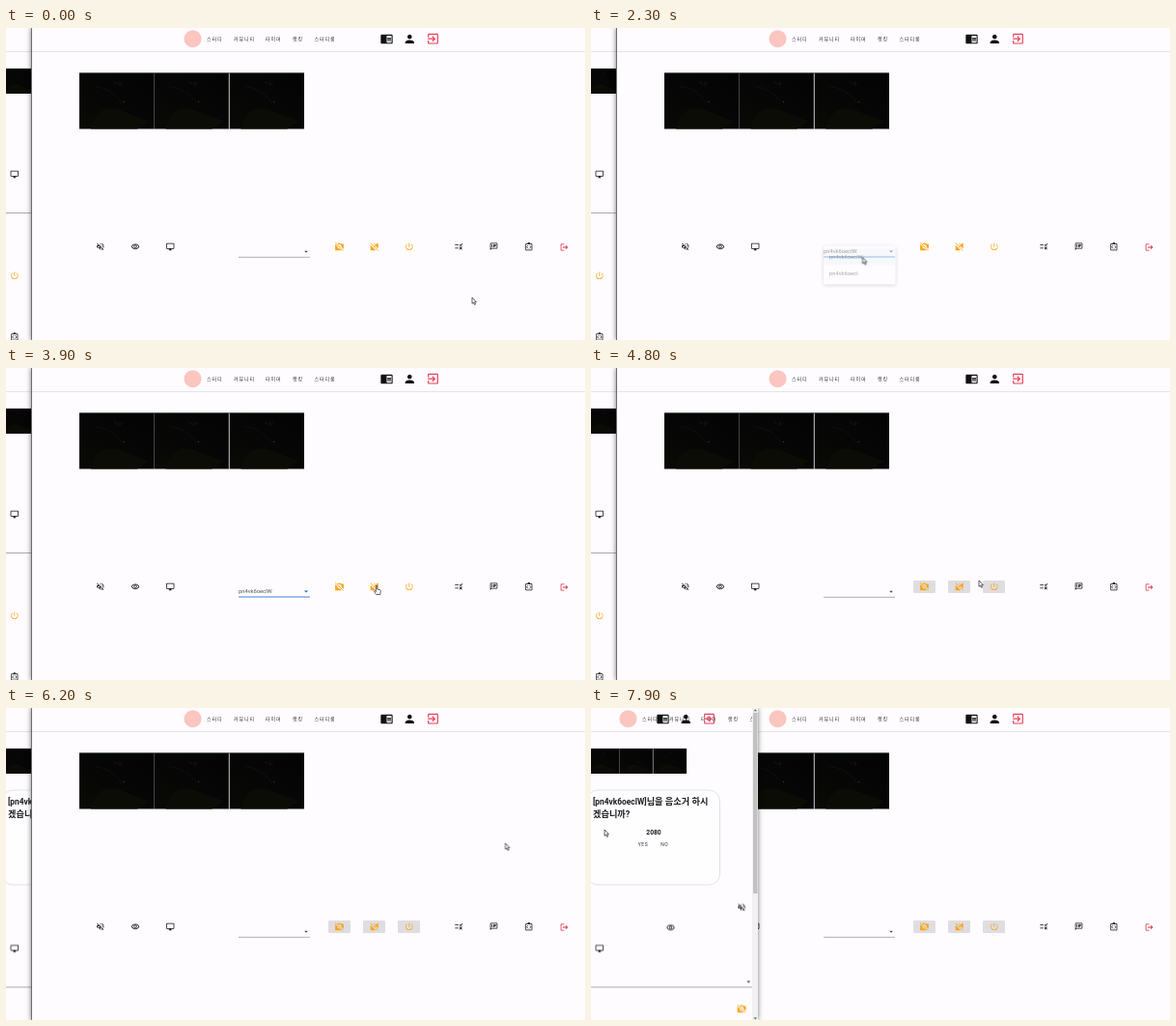
These frames come from a looping animation (600 by 323 pixels, 8000 ms). An HTML page:

```html
<!DOCTYPE html>
<html>
<head>
<meta charset="utf-8">
<title>Study room</title>
<style>
@property --ms { syntax: '<integer>'; inherits: true; initial-value: 4980; }
html, body { margin: 0; width: 100%; height: 100%; overflow: hidden; background: #fefcff; }
#stage { position: relative; width: 600px; height: 323px; overflow: hidden; }
svg { display: block; position: absolute; left: 0; top: 0; }
text { font-family: Roboto, "Noto Sans CJK KR", "Noto Sans CJK JP", sans-serif; }

.win { position: absolute; top: 0; height: 323px; background: #fefcff; box-shadow: 0 0 5px rgba(0, 0, 0, .55); }
.win svg { overflow: hidden; }
#side { left: -10px; width: 183px; border-right: 1px solid #8b8b8d; box-sizing: border-box; z-index: 1; animation: raise 8s step-end infinite; }
#side svg { left: 10px; }
#main { left: 26px; width: 584px; border-left: 1px solid #6d6d6f; box-sizing: border-box; z-index: 2; }
#pointer { z-index: 9; overflow: visible; }

.nav { font-size: 5px; letter-spacing: .9px; fill: #333; }
.opt { font-size: 5.8px; fill: #555; }
.red { fill: #e8405a; }
.amber { fill: #f9a61c; stroke: none; }
.title { font-weight: 700; font-size: 8.4px; fill: #1d1d1f; }
.ko { font-size: 9.2px; }
.btn { font-size: 5px; letter-spacing: .5px; fill: #333; }
#count { position: absolute; left: 55px; width: 40px; top: 125px; text-align: center;
  font: 700 6.7px/9px Roboto, sans-serif; color: #1d1d1f;
  counter-reset: ms var(--ms); animation: count 8s infinite; }
#count::after { content: counter(ms); }

#modal, #count { visibility: hidden; }
#modal { animation: late 8s step-end infinite; }
#count { animation: late 8s step-end infinite, count 8s linear infinite; }
#list { animation: push 8s step-end infinite; }
#off { animation: off 8s step-end infinite; }
#focus { animation: focus 8s step-end infinite; }
#idle { animation: idle 8s step-end infinite; }
#value { animation: value 8s step-end infinite; }
#menu { filter: drop-shadow(0 1.5px 2px rgba(0, 0, 0, .3)); animation: menu 8s linear infinite; }
#cursor { animation: move 8s linear infinite; }
#hand { animation: hand 8s step-end infinite; }
#arrow { animation: arrow 8s step-end infinite; }

@keyframes raise { 0% { z-index: 1 } 92.5%, 100% { z-index: 3 } }
@keyframes late { 0% { visibility: hidden } 62.5%, 100% { visibility: visible } }
@keyframes push { 0% { transform: none } 62.5%, 100% { transform: translateY(97.5px) } }
@keyframes off { 0% { opacity: 0 } 58.75%, 100% { opacity: 1 } }
@keyframes focus { 0% { opacity: 0 } 12.5% { opacity: 1 } 58.75%, 100% { opacity: 0 } }
@keyframes idle { 0% { opacity: 1 } 12.5% { opacity: 0 } 58.75%, 100% { opacity: 1 } }
@keyframes value { 0% { opacity: 0 } 27.5% { opacity: 1 } 58.75%, 100% { opacity: 0 } }
@keyframes menu {
  0%, 12.49% { opacity: 0 } 12.5% { opacity: .5 } 13.75% { opacity: .8 }
  15%, 27.5% { opacity: 1 } 28.75% { opacity: .5 } 30%, 100% { opacity: 0 }
}
@keyframes count {
  0% { --ms: 4980 }
  62.5% { --ms: 4980; animation-timing-function: steps(30) }
  100% { --ms: 1980 }
}
@keyframes hand {
  0% { opacity: 0 } 10% { opacity: 1 } 27.5% { opacity: 0 } 37.5% { opacity: 1 }
  42.5% { opacity: 0 } 43.75% { opacity: 1 } 47.5% { opacity: 0 } 48.75% { opacity: 1 } 58.75%, 100% { opacity: 0 }
}
@keyframes arrow {
  0% { opacity: 1 } 10% { opacity: 0 } 27.5% { opacity: 1 } 37.5% { opacity: 0 }
  42.5% { opacity: 1 } 43.75% { opacity: 0 } 47.5% { opacity: 1 } 48.75% { opacity: 0 } 58.75%, 100% { opacity: 1 }
}
@keyframes move {
  0% { transform: translate(483px, 279px) }
  1.25% { transform: translate(483px, 279px); animation-timing-function: steps(8) }
  11.25% { transform: translate(306px, 232px); animation-timing-function: steps(2) }
  13.75% { transform: translate(305.5px, 234px) }
  16.25% { transform: translate(305.5px, 234px); animation-timing-function: steps(7) }
  25% { transform: translate(281.5px, 237.5px) }
  31.25% { transform: translate(281.5px, 237.5px); animation-timing-function: steps(5) }
  37.5% { transform: translate(383px, 223.5px) }
  41.25% { transform: translate(383px, 223.5px); animation-timing-function: steps(3) }
  45% { transform: translate(418px, 224px) }
  46.25% { transform: translate(418px, 224px); animation-timing-function: steps(2) }
  48.75% { transform: translate(384px, 225px); animation-timing-function: steps(3) }
  52.5% { transform: translate(391px, 227px); animation-timing-function: steps(3) }
  56.25% { transform: translate(385px, 225px) }
  57.5% { transform: translate(385px, 225px); animation-timing-function: steps(2) }
  60% { transform: translate(402px, 220px) }
  70% { transform: translate(402px, 220px); animation-timing-function: steps(5) }
  76.25% { transform: translate(517.5px, 140px) }
  81.25% { transform: translate(517.5px, 140px); animation-timing-function: steps(7) }
  90%, 100% { transform: translate(14px, 126px) }
}
</style>
</head>
<body>
<div id="stage">

<svg width="0" height="0">
  <defs>
    <linearGradient id="dark" x1="0" y1="1" x2="1" y2="0">
      <stop offset="0" stop-color="#0a0a06"/><stop offset=".5" stop-color="#050605"/><stop offset="1" stop-color="#020302"/>
    </linearGradient>

    <!-- icons on a 24-unit grid, centred on 0,0 -->
    <g id="reader"><path transform="translate(-12 -12)" d="M13 12h7v1.5h-7zm0-2.5h7V11h-7zm0 5h7V16h-7zM21 4H3c-1.1 0-2 .9-2 2v13c0 1.1.9 2 2 2h18c1.1 0 2-.9 2-2V6c0-1.1-.9-2-2-2zm0 15h-9V6h9v13z"/></g>
    <g id="person"><path transform="translate(-12 -12)" d="M12 12c2.2 0 4-1.8 4-4s-1.8-4-4-4-4 1.8-4 4 1.8 4 4 4zm0 2c-2.7 0-8 1.3-8 4v2h16v-2c0-2.7-5.3-4-8-4z"/></g>
    <g id="exit"><path transform="translate(-12 -12)" d="M10.1 15.6L11.5 17l5-5-5-5-1.4 1.4 2.6 2.6H3v2h9.7zM19 3H5c-1.1 0-2 .9-2 2v4h2V5h14v14H5v-4H3v4c0 1.1.9 2 2 2h14c1.1 0 2-.9 2-2V5c0-1.1-.9-2-2-2z"/></g>
    <g id="mute"><path transform="translate(-12 -12)" d="M4.3 2.9L2.9 4.3l4.4 4.4L7 9H3v6h4l5 5v-6.6l4.2 4.2c-.7.5-1.4.9-2.2 1.1v2.1c1.3-.3 2.6-.9 3.6-1.8l2 2.1 1.5-1.4zM10 15.2L7.8 13H5v-2h2.8l.9-.9 1.3 1.3zM19 12c0 .8-.1 1.6-.4 2.3l1.5 1.6c.6-1.2.9-2.5.9-3.9 0-4.3-3-7.9-7-8.8v2.1c2.9.8 5 3.5 5 6.7zm-7-8l-1.9 1.9L12 7.8zm4.5 8c0-1.8-1-3.3-2.5-4v1.8l2.5 2.4z"/></g>
    <g id="eye"><path transform="translate(-12 -11.5)" d="M12 6c3.8 0 7.2 2.1 8.8 5.5-1.6 3.4-5 5.5-8.8 5.5s-7.2-2.1-8.8-5.5C4.800 8.100 8.200 6 12 6m0-2C7 4 2.700 7.100 1 11.500 2.700 15.900 7 19 12 19s9.300-3.100 11-7.500C21.300 7.100 17 4 12 4zm0 5a2.500 2.500 0 0 1 0 5 2.500 2.500 0 0 1 0-5m0-2a4.500 4.500 0 0 0 0 9 4.500 4.500 0 0 0 0-9z"/></g>
    <g id="screen"><path transform="translate(-12 -12)" d="M21 2H3c-1.100 0-2 .9-2 2v12c0 1.100.9 2 2 2h7v2H8v2h8v-2h-2v-2h7c1.100 0 2-.9 2-2V4c0-1.100-.9-2-2-2zm0 14H3V4h18z"/></g>
    <g id="cam">
      <path d="M-4-9h7l2 2h5a1 1 0 0 1 1 1V6L5 1A5 5 0 0 0-2-5L-6-8zM-11-6l6 5A5 5 0 0 0 1 5l5 5H-10a1 1 0 0 1-1-1z"/>
      <path d="M-11-10L10 10M-2-1L1 2" fill="none" stroke="#f9a61c" stroke-width="2"/>
    </g>
    <g id="chatoff">
      <path d="M-10 10V-4L4 10zM10-9V5L2-2zM-2-7H4L1-4z"/>
      <path d="M-10-9L10 10M9-9L-3 3" fill="none" stroke="#f9a61c" stroke-width="2.2"/>
    </g>
    <g id="power"><path transform="translate(-12 -12)" d="M13 3h-2v10h2zm4.800 2.200l-1.400 1.400A7 7 0 1 1 7.600 6.600L6.200 5.200a9 9 0 1 0 11.600 0z"/></g>
    <g id="rule"><path transform="translate(-12 -12)" d="M16.500 11L13 7.500l1.400-1.400 2.100 2.100 4.300-4.300 1.400 1.400zM11 7H2v2h9zm10 6.400L19.600 12 17 14.600 14.400 12 13 13.400l2.600 2.600-2.600 2.600 1.400 1.400 2.600-2.600 2.600 2.600 1.400-1.400-2.600-2.600zM11 15H2v2h9z"/></g>
    <g id="chat"><path transform="translate(-12 -12)" d="M20 2H4c-1.100 0-2 .9-2 2v18l4-4h14c1.100 0 2-.9 2-2V4c0-1.100-.9-2-2-2zm0 14H5.200L4 17.200V4h16zM6 12h2v2H6zm0-3h2v2H6zm0-3h2v2H6zm4 6h5v2h-5zm0-3h8v2h-8zm0-3h8v2h-8z"/></g>
    <g id="code">
      <path d="M-8-7H8V9H-8zM-2-3l-3.500 4L-2 5M2-3l3.500 4L2 5" fill="none" stroke="#222" stroke-width="2"/>
      <path d="M-3.500-7a3.500 3.500 0 0 1 7 0z"/>
    </g>
    <g id="leave"><path transform="translate(-12 -12)" d="M17 7l-1.400 1.400 2.600 2.600H8v2h10.200l-2.600 2.600L17 17l5-5zM4 5h8V3H4c-1.100 0-2 .9-2 2v14c0 1.100.9 2 2 2h8v-2H4z"/></g>

    <g id="tile">
      <rect width="77.500" height="58" fill="url(#dark)"/>
      <path d="M12 56C18 36 30 34 46 40L72 50 60 58H12z" fill="#0c0c07"/>
      <path d="M16 14Q34 16 44 31" fill="none" stroke="#10100a"/>
      <path d="M36 9l4 3M42 9v4M45 10l-2 2" fill="none" stroke="#262622" stroke-width=".6"/>
      <circle cx="46" cy="30" r=".8" fill="#38381a"/>
    </g>
    <g id="tiles">
      <use href="#tile"/><use href="#tile" x="77.500"/><use href="#tile" x="155.500"/>
      <path d="M155.200 0v58" stroke="#b9b9b5" stroke-width=".8"/>
      <path d="M0 .3h233" stroke="#1d2a22" stroke-width=".6"/>
    </g>

    <g id="nav">
      <circle cx="193.500" cy="11.200" r="9" fill="#fac6bf"/>
      <g class="nav">
        <text x="208" y="13.200">스터디</text><text x="236" y="13.200">커뮤니티</text>
        <text x="269" y="13.200">타이머</text><text x="297" y="13.200">랭킹</text>
        <text x="319.500" y="13.200">스터디룸</text>
      </g>
    </g>
    <g id="acts">
      <use href="#reader" transform="translate(394.500 11.300) scale(.56)"/>
      <use href="#person" transform="translate(418.300 11.300) scale(.58)"/>
      <use href="#exit" class="red" transform="translate(442.500 11.200) scale(.6)"/>
    </g>
  </defs>
</svg>

<div id="side" class="win">
  <svg width="173" height="323" viewBox="0 0 173 323" fill="#111">
    <path d="M0 24.500h168" stroke="#e6e4e8"/>
    <use href="#nav" x="-155"/>
    <use href="#acts" x="-320"/>
    <use href="#tiles" transform="translate(-5.300 42) scale(.448)"/>
    <g id="modal">
      <rect x="-4" y="85" width="137.500" height="98" rx="11" fill="#fefdff" stroke="#dcdadd" stroke-width=".8"/>
      <text class="title" x="2" y="100">[pn4vk6oeclW]<tspan class="ko">님을 음소거 하시</tspan></text>
      <text class="title ko" x="2" y="112.500">겠습니까?</text>
      <text class="btn" x="48.800" y="142.800">YES</text>
      <text class="btn" x="72.300" y="142.800">NO</text>
    </g>
    <g id="list">
      <use href="#mute" transform="translate(156 108.800) scale(.4)"/>
      <use href="#eye" transform="translate(82.500 129.700) scale(.38)"/>
      <use href="#screen" transform="translate(8.800 151.500) scale(.38)"/>
      <path d="M0 191.500h167" stroke="#a2a1a4" stroke-width=".9"/>
      <path d="M161.200 185h4l-2 2.200z" fill="#555"/>
      <g class="amber">
        <use href="#cam" transform="translate(156 213.800) scale(.4)"/>
        <use href="#chatoff" transform="translate(82.500 235) scale(.4)"/>
        <use href="#power" transform="translate(8.800 256.300) scale(.42)"/>
      </g>
      <use href="#rule" transform="translate(156 277) scale(.4)"/>
      <use href="#chat" transform="translate(82.500 298) scale(.38)"/>
      <use href="#code" transform="translate(8.800 319.500) scale(.4)"/>
    </g>
    <path d="M167 0h6v323h-6z" fill="#f1f1f1"/>
    <path d="M168 5h4.500v187H168z" fill="#c1c1c1"/>
    <path d="M168.500 3.200h3.500l-1.700-2zM168.500 320.500h3.500l-1.700 2z" fill="#666"/>
  </svg>
  <div id="count"></div>
</div>

<div id="main" class="win">
  <svg width="573" height="323" viewBox="27 0 573 323" fill="#111">
    <path d="M27 24.500h573" stroke="#e6e4e8"/>
    <use href="#nav"/>
    <use href="#acts"/>
    <use href="#tiles" transform="translate(76 46.500)"/>

    <use href="#mute" transform="translate(97.800 226.300) scale(.4)"/>
    <use href="#eye" transform="translate(134 226.300) scale(.38)"/>
    <use href="#screen" transform="translate(170.200 226.500) scale(.38)"/>

    <g id="idle">
      <path d="M241 237.300h74" stroke="#9b9a9d" stroke-width=".8"/>
      <path d="M309.200 230.700h3.600l-1.800 2z" fill="#444"/>
    </g>
    <g id="focus">
      <path d="M241 237h74" stroke="#3d86d2" stroke-width="1.200"/>
      <path d="M309 230.400h4l-2 2.200z" fill="#1f5f9f"/>
    </g>
    <text id="value" class="opt" x="241" y="233.200">pn4vk6oeclW</text>

    <g id="off" fill="#dfdde0">
      <rect x="334" y="220" width="23" height="13" rx="1.200"/>
      <rect x="370" y="220" width="23" height="13" rx="1.200"/>
      <rect x="406" y="220" width="23" height="13" rx="1.200"/>
    </g>
    <g class="amber">
      <use href="#cam" transform="translate(345.500 226.300) scale(.4)"/>
      <use href="#chatoff" transform="translate(381.700 226.300) scale(.4)"/>
      <use href="#power" transform="translate(417.800 226.300) scale(.42)"/>
    </g>
    <use href="#rule" transform="translate(469.300 226.300) scale(.4)"/>
    <use href="#chat" transform="translate(505.500 226.300) scale(.38)"/>
    <use href="#code" transform="translate(541.800 226.300) scale(.4)"/>
    <use href="#leave" fill="#d8283f" transform="translate(578.500 227) scale(.38)"/>

    <g id="menu">
      <rect x="241" y="225.500" width="74.500" height="40" rx="1.500" fill="#fefdff"/>
      <path d="M241 228.500h74.500V245H241z" fill="#eef4fa"/>
      <text class="opt" x="247" y="239">pn4vk6oeclW</text>
      <text class="opt" x="247" y="255.800">pn4vk6oecl</text>
    </g>
  </svg>
</div>

<svg id="pointer" width="600" height="323">
  <g id="cursor" fill="#fff" stroke="#222" stroke-width=".7" stroke-linejoin="round">
    <path id="arrow" d="M0 0v6.300l1.400-1.200 1.200 2.400 1-.5-1.100-2.300h1.900z"/>
    <path id="hand" d="M-.7.700q.7-1 1.400 0V4l2.800.7q1 .3.800 1.500L3.700 9.500H-.3L-2.600 6.300q.2-1 1.200-.4l.7.700z"/>
  </g>
</svg>

</div>
</body>
</html>
```
